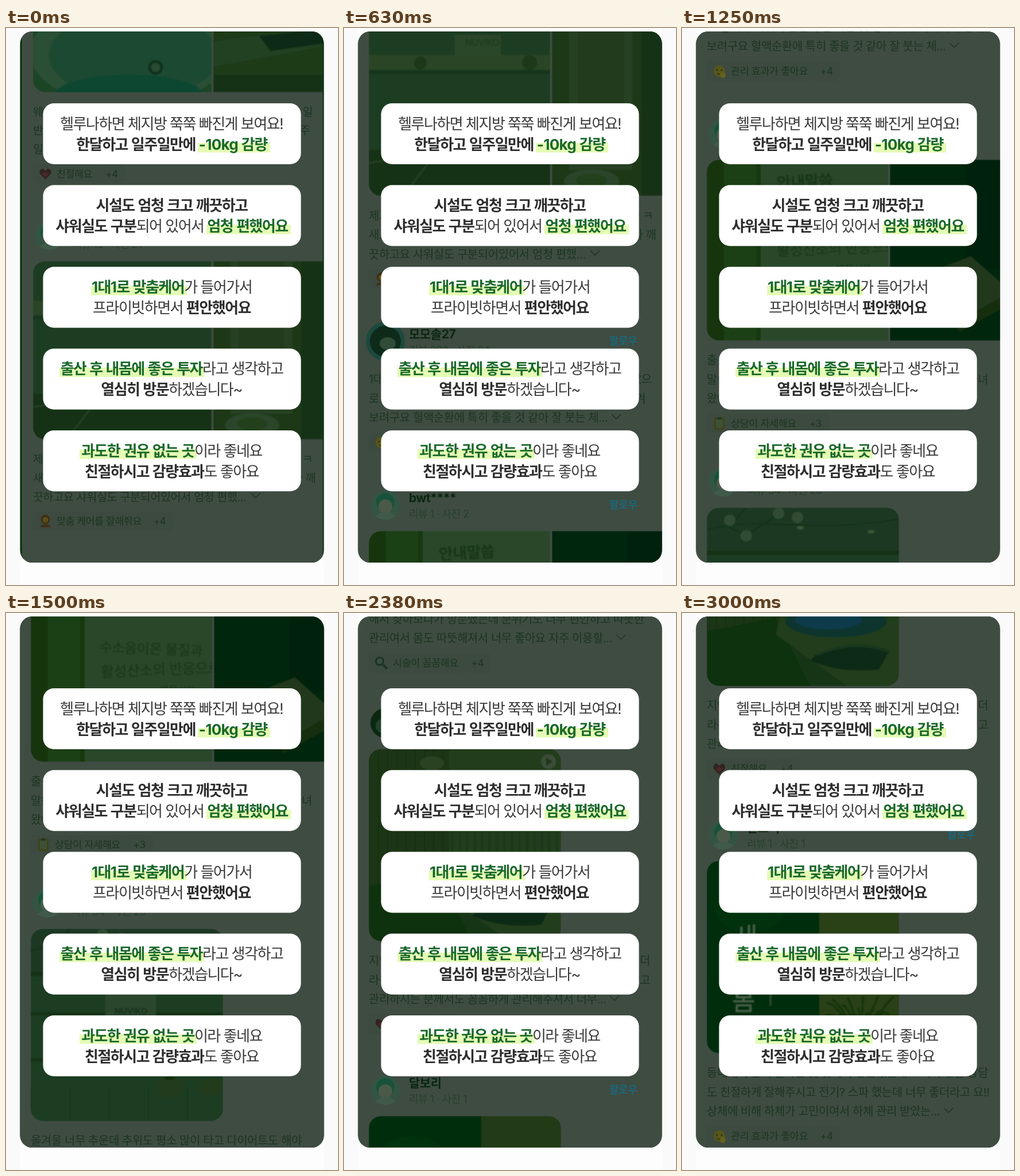
Write an HTML page that moves like this. It is 578x969 px and loops after 3.13 s.

```html
<!DOCTYPE html>
<html lang="ko">
<meta charset="utf-8">
<title>Reviews</title>
<style>
  html, body { margin: 0; height: 100%; overflow: hidden; background: #fafafa }
  svg { display: block; width: 578px; height: 969px }
  text { font-family: "Noto Sans CJK KR", "Noto Sans CJK", sans-serif; letter-spacing: -.45px }
  .latin { font-family: Inter, "Noto Sans CJK KR", sans-serif }
  .quote { letter-spacing: -1.5px; font-size: 26px; text-anchor: middle; fill: #3a3a3a }
  .quote .latin { letter-spacing: -.7px }
  .bold { font-weight: 700; fill: #2e2e2e }
  .mark { font-weight: 700; fill: #1b692b }
</style>
<svg id="stage" viewBox="0 0 578 969"></svg>
<script>
const LOOP = 3130, LEFT = 43;
const PANEL = '#3f4c42', BODY = '#1c3520', MUTED = '#26402c';

const rect = (x, y, w, h, fill, extra = '') =>
  `<rect x="${x}" y="${y}" width="${w}" height="${h}" fill="${fill}" ${extra}/>`;
const disc = (x, y, r, fill, ry = r) => `<ellipse cx="${x}" cy="${y}" rx="${r}" ry="${ry}" fill="${fill}"/>`;
const shape = (d, fill) => `<path d="${d}" fill="${fill}"/>`;
const stroke = (d, color, width) => `<path d="${d}" fill="none" stroke="${color}" stroke-width="${width}"/>`;
const latin = s => s.replace(/[!-~]+/g, '<tspan class="latin">$&</tspan>');
// y is the middle of the line of text
const label = (x, y, size, fill, s, extra = '') =>
  `<text x="${x}" y="${y + size * .37}" font-size="${size}" fill="${fill}" ${extra}>${latin(s)}</text>`;
const repeat = (n, draw) => Array.from({ length: n }, (_, i) => draw(i)).join('');

// Photos: drawn in a box whose origin is its top left corner
const photos = {
  bath: () => rect(0, 0, 316, 315, '#203f22') + rect(0, 150, 316, 165, '#1d4426') +
    disc(170, 245, 175, '#2c5034', 95) + disc(178, 250, 150, '#1d4830', 78) +
    disc(170, 318, 130, '#0c4632', 34) +
    disc(217, 271, 13, '#0f311b') + disc(217, 271, 8, '#2a4a30') +
    rect(319, 0, 220, 315, '#1b3a17') + shape('M319 225L510 200V235L319 270Z', '#233f22') +
    shape('M400 215L500 205 520 228 420 242Z', '#0f2b13') + rect(319, 285, 220, 30, '#123316'),
  shelf: () => rect(0, 0, 316, 315, '#1f3c20') + rect(0, 70, 316, 26, '#294526') + rect(0, 96, 316, 7, '#18351a') +
    rect(150, 35, 80, 37, '#2b4629') + label(168, 48, 16, '#1b381b', 'NUVIKO') +
    disc(90, 84, 11, '#1d3918') + disc(280, 83, 13, '#1d3918') +
    rect(0, 235, 316, 80, '#153317') + stroke('M0 258L120 240M60 315L110 250', '#263f25', 3) +
    rect(319, 0, 220, 315, '#1f3919') + rect(349, 0, 110, 270, '#274022') + rect(364, 0, 80, 250, '#213a1a') +
    rect(475, 0, 70, 315, '#163213') + disc(388, 290, 48, '#2c452a', 21) + disc(388, 288, 27, '#233f1d', 12),
  sign: () => rect(0, 0, 316, 315, '#1c3f16') + rect(0, 0, 30, 315, '#123410') +
    rect(92, 0, 224, 315, '#2b4629') + rect(86, 0, 8, 315, '#17370f') +
    label(122, 40, 27, '#163419', '안내말씀', 'font-weight="700" transform="rotate(-3 122 40)"') +
    label(120, 115, 24, '#163419', '수소음이온 물질과', 'textLength="" transform="rotate(2 120 115)"'.replace('textLength="" ', '')) +
    label(122, 158, 25, '#163419', '활성산소의 반응으로', 'transform="rotate(-2 122 158)"') +
    label(225, 190, 17, '#193819', '반응시켜') +
    rect(319, 0, 220, 315, '#032508') + rect(450, 0, 89, 190, '#01200a') +
    shape('M365 205L460 168 530 230 430 285Z', '#20391c') + shape('M430 285L530 230V250L440 300Z', '#142f0e'),
  lounge: () => rect(0, 0, 335, 335, '#1f3c22') + rect(0, 0, 335, 80, '#1a3921') +
    stroke('M0 38C100 12 160 48 335 20M68 0L40 35 70 48 130 8', '#12301a', 2.5) +
    [[40, 22], [69, 49], [125, 10], [158, 17]].map(p => disc(...p, 10, '#304b34')).join('') +
    disc(163, 35, 6, '#3b5639', 3) + disc(286, 42, 6, '#3b5639', 3) +
    rect(0, 75, 335, 8, '#143119') + rect(0, 145, 335, 6, '#163218') + rect(0, 225, 335, 6, '#163218') +
    rect(130, 100, 88, 80, '#2c462d') + label(146, 143, 15, '#18331b', 'NUVIKO', 'font-weight="700"') +
    rect(0, 273, 335, 62, '#1b3e22') + repeat(5, i => rect(i * 68, 275, 2, 60, '#13341b')) +
    disc(242, 275, 23, '#233a1a', 18) + disc(313, 275, 21, '#233a1a', 16) + disc(242, 260, 9, '#142d10', 3),
  spa: () => rect(0, 0, 335, 335, '#1c3613') + repeat(9, i => rect(i * 16, 0, 2, 235, '#17310f')) +
    rect(140, 0, 195, 215, '#203e1e') + repeat(15, i => rect(143 + i * 13, 50, 5, 165, '#1a391b')) +
    disc(110, 25, 21, '#2c4320', 12) + rect(0, 235, 335, 100, '#183412') +
    shape('M0 240L120 215 180 335H0Z', '#0b300b') + shape('M130 205L335 185V335H245L120 245Z', '#233d1b') +
    disc(225, 222, 88, '#0d352d', 28) + disc(212, 220, 58, '#113b4c', 16) +
    shape('M190 280Q255 250 318 273L300 306Q230 313 180 290Z', '#0b2c14') +
    stroke('M192 281Q255 253 316 275', '#203e26', 2) +
    disc(313, 22, 13, '#3b4d39') + shape('M309 15L320 22 309 29Z', '#1c3419'),
  garden: () => rect(0, 0, 335, 335, '#032d0d') + rect(196, 0, 139, 335, '#2b3f12') +
    rect(196, 0, 139, 70, '#213a16') + disc(76, 80, 62, '#05320f', 45) +
    label(48, 132, 44, '#47624a', '새') + label(44, 244, 44, '#47624a', '봄') +
    rect(110, 222, 2, 30, '#35533a') +
    repeat(15, i => stroke(`M265 320Q${225 + i * 6} 250 ${200 + i * 9} ${255 + 20 * Math.cos(i * 2)}`, '#143611', 4)),
};

// Small icons beside the tags, drawn around 0,0
const icons = {
  heart: shape('M0 10L-10 0Q-11 -9 -4 -9L0 -5 4 -9Q11 -9 10 0Z', '#33231f') + shape('M0 6L-6 0 0 -3 6 0Z', '#4a2a28'),
  person: disc(0, -3, 8, '#3f2c14') + disc(0, -2, 5, '#5a5018') + shape('M-10 11Q0 0 10 11Z', '#432f18'),
  smile: disc(0, 0, 10, '#58561a') + disc(-4, -2, 1.5, '#20300f') + disc(4, -2, 1.5, '#20300f') +
    stroke('M-4 4Q0 7 4 4', '#20300f', 1.5) + disc(6, 7, 5, '#66601e'),
  clipboard: rect(-9, -10, 18, 21, '#40431a') + rect(-6, -7, 12, 15, '#3d5137') + rect(-4, -11, 8, 4, '#24361f'),
  lens: disc(-3, -3, 8, '#1c3421') + disc(-3, -3, 5, '#375044') + stroke('M3 3L10 10', '#1c3421', 4),
};

function avatar(kind, x, y) {
  if (kind === 'ring') return disc(x, y, 34, '#1c493d') + disc(x, y, 27, '#0e2b1a') + disc(x + 4, y + 4, 14, '#304b38', 11);
  if (kind === 'dark') return disc(x, y, 26, '#0b2811') + disc(x - 5, y + 5, 12, '#21402a');
  return disc(x, y, 26, '#345443') + disc(x, y - 5, 16, '#17523a') + disc(x, y + 2, 12, '#4b5a48') +
    shape(`M${x - 18} ${y + 19}Q${x} ${y + 5} ${x + 18} ${y + 19}Q${x} ${y + 32} ${x - 18} ${y + 19}Z`, '#405a4a');
}

// top: photo top (or the end of the header), h: photo height, chevron: x after the third line
const reviews = [
  { top: -209, h: 315, photo: 'bath', face: 'plain', name: '하늘콩', info: '리뷰 7 · 사진 9', tag: '친절해요', icon: 'heart', more: '+4',
    lines: ['웨딩 앞두고 급하게 관리 받았는데 정말 너무 좋았어요 매주 일', '반신욕을 하고 나니까 땀도 쭉쭉 빠지고 몸이 가벼워져서 아주', '일주일만에 벌써 효과가 보여서 신기해요'] },
  { top: 404.5, h: 315.5, photo: 'shelf', face: 'plain', name: '별솔잎', info: '리뷰 16 · 사진 21', tag: '맞춤 케어를 잘해줘요', icon: 'person', more: '+4', chevron: 437,
    lines: ['제가 다녀본 곳 중에서 정말 제일 만족스러운 곳이에요 진짜 ㅋ', '새로 생겨서 그런지 시설도 너무 엄청 크고 정말 깔끔하고 다 깨', '끗하고요 샤워실도 구분되어있어서 엄청 편했...'] },
  { top: 1017.6, h: -13, face: 'ring', name: '모모솔27', info: '리뷰 203 · 사진 24', tag: '관리 효과가 좋아요', icon: 'smile', more: '+4', chevron: 474,
    lines: ['1대1 프라이빗 케어라서 더 편하게 관리 받을 수 있어서 좋았으', '로 몸이 무거워서 순환이 안 되는 것 같아 이제 미리미리 챙겨', '보려구요 혈액순환에 특히 좋을 것 같아 잘 붓는 체...'] },
  { top: 1302.6, h: 315, photo: 'sign', face: 'plain', name: 'bwt****', info: '리뷰 1 · 사진 2', tag: '상담이 자세해요', icon: 'clipboard', more: '+3',
    lines: ['출산하고 나서 몸이 너무 무거웠는데 지인 추천으로 왔', '말씀도 잘 해주시고 상담도 정말 자세하게 해주셔서 믿고 다녀', '왔어요 앞으로도 꾸준히 다녀볼게요'] },
  { top: 1908, h: 334.6, photo: 'lounge', face: 'plain', name: '푸른결', info: '리뷰 34 · 사진 23', tag: '시술이 꼼꼼해요', icon: 'lens', more: '+4', chevron: 482,
    lines: ['올겨울 너무 추운데 추위도 평소 많이 타고 다이어트도 해야', '해서 찾아보다가 방문했는데 분위기도 너무 편안하고 따뜻한', '관리여서 몸도 따뜻해져서 너무 좋아요 자주 이용할...'] },
  { top: 2536, h: 334.6, photo: 'spa', face: 'dark', name: '콩담', info: '리뷰 12 · 사진 8', tag: '친절해요', icon: 'heart', more: '+4', chevron: 471,
    lines: ['지인 추천으로 처음 방문했는데 생각했던 것보다 훨씬 좋고 더', '라운지도 예쁘고 음료도 챙겨주셔서 너무 기분 좋게 쉬다 왔고', '관리하시는 분께서도 꼼꼼하게 관리해주셔서 너무...'] },
  { top: 3174.6, h: 335, photo: 'garden', face: 'plain', name: '달보리', info: '리뷰 1 · 사진 1', tag: '관리 효과가 좋아요', icon: 'smile', more: '+4', chevron: 464,
    lines: ['동네에서 관리 잘하는 곳 찾다가 방문했는데요 여기 정말 상담', '도 친절하게 잘해주시고 전기? 스파 했는데 너무 좋더라고 요!!', '상체에 비해 하체가 고민이여서 하체 관리 받았는...'] },
];

function review(r, i) {
  const { top, h } = r, end = top + h, tagY = end + 144;
  const tagWidth = [...r.tag].reduce((w, ch) => w + (ch === ' ' ? 3.4 : 15.6), 0);
  const moreX = 85 + tagWidth + 24;
  let out = avatar(r.face, 72, top - 45) +
    label(113, top - 58, 21, '#0a2710', r.name, 'font-weight="700"') +
    label(113, top - 30, 18, MUTED, r.info) +
    label(462, top - 46, 18, '#1d6677', '팔로우', 'font-weight="700"');
  if (r.photo) {
    const wide = h < 320;
    out += `<clipPath id="clip${i}">${rect(0, 0, wide ? 540 : 335, h, '#000', 'rx="22"')}</clipPath>
      <g transform="translate(${LEFT} ${top})"><g clip-path="url(#clip${i})"><g filter="url(#soft)">${photos[r.photo]()}</g>
      ${wide ? rect(316, 0, 3, h, PANEL) : ''}</g></g>`;
  }
  out += r.lines.map((s, n) => label(LEFT, end + 34 + n * 33.5, 20, BODY, s)).join('');
  if (r.chevron) out += stroke(`M${r.chevron - 8} ${end + 95}l8 8 8 -8`, BODY, 1.5);
  return out + rect(LEFT, tagY - 17, tagWidth + 54, 34, '#3c4a3f', 'rx="6"') +
    rect(moreX - 12, tagY - 17, 46, 34, '#3c4a3f', 'rx="6"') +
    `<g transform="translate(65 ${tagY})">${icons[r.icon]}</g>` +
    label(85, tagY, 17.5, BODY, r.tag) + label(moreX, tagY, 17.5, BODY, r.more);
}

// Each quote: two lines of [style, text] runs, and the highlight as [x, line, width]
const quotes = [
  [[['', '헬루나하면 체지방 쭉쭉 빠진게 보여요!']], [['bold', '한달하고 일주일만에 '], ['mark', '-10kg 감량']], [334, 1, 126]],
  [[['bold', '시설도 엄청 크고 깨끗하고']], [['bold', '샤워실도 구분'], ['', '되어 있어서 '], ['mark', '엄청 편했어요']], [349, 1, 147]],
  [[['mark', '1대1로 맞춤케어'], ['', '가 들어가서']], [['', '프라이빗하면서 '], ['bold', '편안했어요']], [148, 0, 167]],
  [[['mark', '출산 후 내몸에 좋은 투자'], ['', '라고 생각하고']], [['bold', '열심히 방문'], ['', '하겠습니다~']], [93, 0, 252]],
  [[['mark', '과도한 권유 없는 곳'], ['', '이라 좋네요']], [['bold', '친절하시고 감량효과'], ['', '도 좋아요']], [128, 0, 204]],
];

function card([first, second, [x, line, width]], i) {
  const y = 131 + i * 142.25;
  const row = (runs, n) => `<text class="quote" x="288.5" y="${y + 35 + n * 36 + 9.6}">` +
    runs.map(([style, s]) => `<tspan class="${style}">${latin(s)}</tspan>`).join('') + '</text>';
  return rect(64.5, y, 449, 106, '#fff', 'rx="19"') + rect(x, y + 33 + line * 36, width, 16.5, '#e4fcb4') +
    row(first, 0) + row(second, 1);
}

stage.innerHTML = rect(25, 0, 529, 969, '#fdfdfd') +
  `<filter id="soft" x="0" y="0" width="1" height="1"><feGaussianBlur stdDeviation="1.3" edgeMode="duplicate"/></filter>
  <clipPath id="window">${rect(24.5, 6, 529, 924, '#000', 'rx="21"')}</clipPath>
  <clipPath id="screen">${rect(23, -20, 533, 980, '#000')}</clipPath>
  <g clip-path="url(#window)">${rect(24, 6, 530, 924, '#02300f')}
    <g id="zoom" clip-path="url(#screen)">${rect(23, -20, 533, 980, PANEL)}<g id="feed">${reviews.map(review).join('')}</g></g>
  </g>` + quotes.map(card).join('');

const zoom = document.getElementById('zoom'), feed = document.getElementById('feed');

// Smooth scroll curve through [step, distance] points (Lagrange polynomial)
const path = [[0, 0], [5, 427.6], [10, 1073.6], [12, 1358.6], [16, 1922.6], [19, 2299.6], [24, 2743.6]];
const scrollAt = k => path.reduce((sum, [a, distance]) =>
  sum + path.reduce((p, [b]) => b === a ? p : p * (k - b) / (a - b), distance), 0);

function draw(now) {
  // 8 steps per second, with times rounded up to 10 ms
  const step = Math.floor(Math.floor(now % LOOP / 10) / 12.5);
  const scale = 1 - .016 * Math.max(0, 1 - step / 4) ** 2;
  zoom.setAttribute('transform', `translate(289 468) scale(${scale}) translate(-289 -468)`);
  feed.setAttribute('transform', `translate(0 ${-scrollAt(step)})`);
}

let start;
function tick(now) {
  start ??= now;
  draw(now - start);
  requestAnimationFrame(tick);
}
draw(0);
requestAnimationFrame(tick);
</script>
</html>
```
